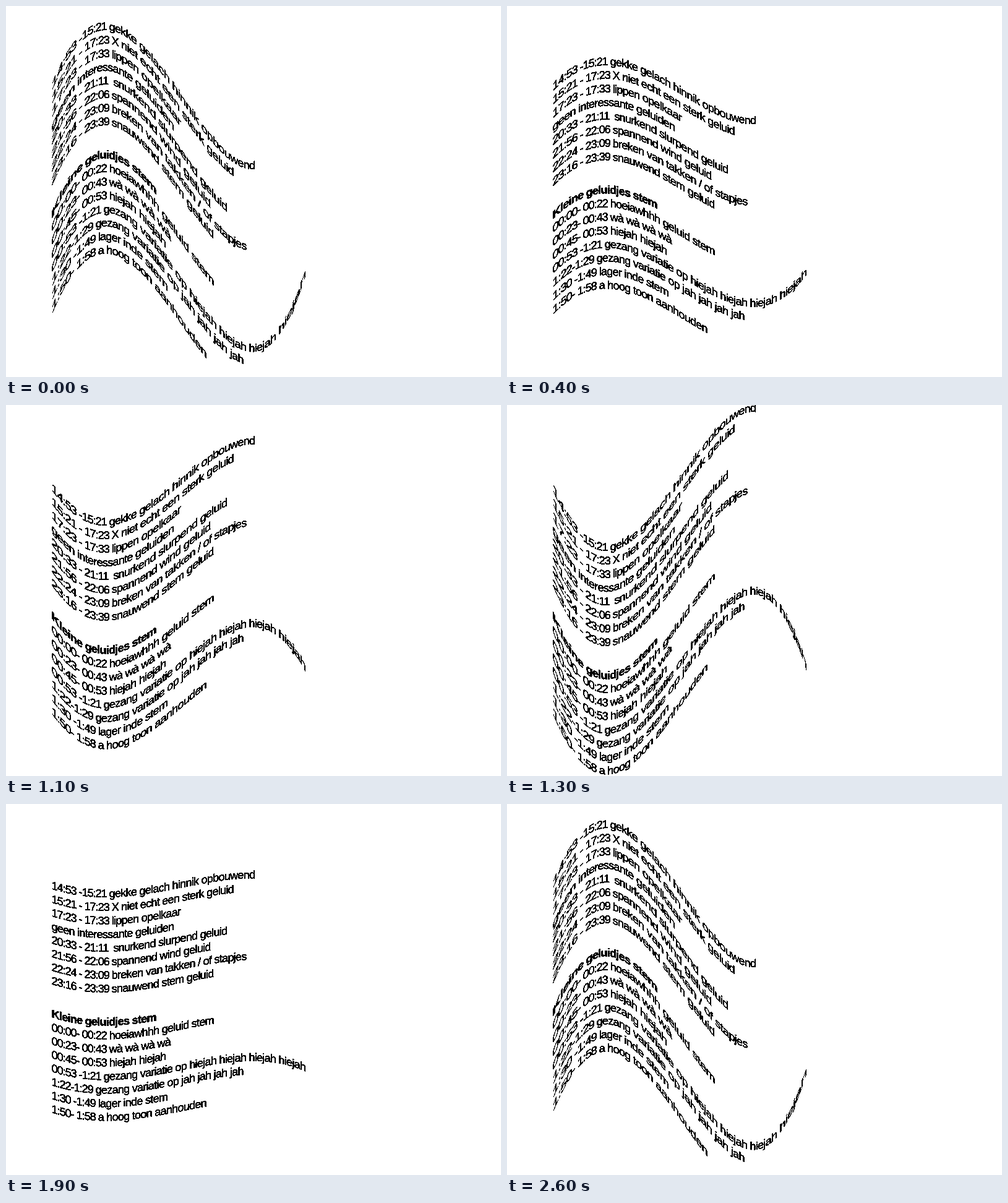
An HTML page with a canvas that plays this animation: 800 by 600 pixels, repeating every 2700 ms.

```html
<!DOCTYPE html>
<html lang="nl">
<head>
<meta charset="utf-8">
<title>Golvende tekst</title>
<style>
  html, body { margin: 0; width: 100%; height: 100%; overflow: hidden; background: #fff; }
  canvas { display: block; }
</style>
</head>
<body>
<canvas id="stage" width="800" height="600"></canvas>
<script>
const WIDTH = 800, HEIGHT = 600, SCALE = 4;
const LEFT = 73.6, TOP = 137.5, LEADING = 22;
const WAVE_START = 74, WAVE_WIDTH = 411;
const INK_THRESHOLD = 72;
const HEADING = 'Kleine geluidjes stem';
const lines = [
  '14:53 -15:21 gekke gelach hinnik opbouwend',
  '15:21 - 17:23 X niet echt een sterk geluid',
  '17:23 - 17:33 lippen opelkaar',
  'geen interessante geluiden',
  '20:33 - 21:11  snurkend slurpend geluid',
  '21:56 - 22:06 spannend wind geluid',
  '22:24 - 23:09 breken van takken / of stapjes',
  '23:16 - 23:39 snauwend stem geluid',
  HEADING,
  '00:00- 00:22 hoeiawhhh geluid stem',
  '00:23- 00:43 wà wà wà wà',
  '00:45- 00:53 hiejah hiejah',
  '00:53 -1:21 gezang variatie op hiejah hiejah hiejah hiejah',
  '1:22-1:29 gezang variatie op jah jah jah jah',
  '1:30 -1:49 lager inde stem',
  '1:50- 1:58 a hoog toon aanhouden'
];

function makeLayer() {
  const canvas = document.createElement('canvas');
  canvas.width = 500 * SCALE;
  canvas.height = HEIGHT * SCALE;
  return canvas.getContext('2d');
}

const flat = makeLayer();
const warped = makeLayer();
const stage = document.getElementById('stage').getContext('2d', { willReadFrequently: true });
stage.imageSmoothingQuality = 'high';

function write(text, x, y, spacing) {
  flat.letterSpacing = spacing + 'px';
  flat.fillText(text, x, y);
  flat.strokeText(text, x, y);
  return x + flat.measureText(text).width;
}

function drawText() {
  flat.scale(SCALE, SCALE);
  flat.lineWidth = 0.35;
  flat.lineJoin = 'round';
  let y = TOP;
  for (const line of lines) {
    const isHeading = line === HEADING;
    if (isHeading) y += 31.5;
    flat.font = (isHeading ? 'bold ' : '') + '18px "Liberation Sans", Arial, sans-serif';
    const time = line.match(/^[\d: -]*/)[0];
    const x = write(time, LEFT, y, -1);
    write(line.slice(time.length), x, y, -0.71);
    y += LEADING;
  }
}

// Flag curve: fixed at both ends, a crest and a slightly deeper trough.
function offset(x, bend) {
  const u = (x - WAVE_START) / WAVE_WIDTH;
  return bend * u * (1 - u) * (0.482 - u) * (2080 + 500 * u);
}

// The bend rises in even steps, then snaps to the opposite extreme and returns.
function bendAt(step) {
  const direction = Math.floor(step / 13) % 2 ? -1 : 1;
  return direction * (-1 + 0.144 * (step % 13));
}

function render(bend) {
  const { width, height } = warped.canvas;
  warped.clearRect(0, 0, width, height);
  for (let x = 70 * SCALE; x < 490 * SCALE; x++) {
    const dy = Math.round(offset(x / SCALE, bend) * SCALE);
    warped.drawImage(flat.canvas, x, 0, 1, height, x, dy, 1, height);
  }
  stage.clearRect(0, 0, WIDTH, HEIGHT);
  stage.drawImage(warped.canvas, 0, 0, width / SCALE, HEIGHT);

  // Hard, unsmoothed edges.
  const image = stage.getImageData(0, 0, WIDTH, HEIGHT);
  for (let i = 3; i < image.data.length; i += 4) {
    image.data[i] = image.data[i] > INK_THRESHOLD ? 255 : 0;
  }
  stage.putImageData(image, 0, 0);
}

drawText();
const start = performance.now();
let shown = -1;

function tick() {
  const step = Math.floor((performance.now() - start) % 2700 / 100);
  if (step !== shown) {
    shown = step;
    render(bendAt(step));
  }
  requestAnimationFrame(tick);
}
tick();
</script>
</body>
</html>
```
